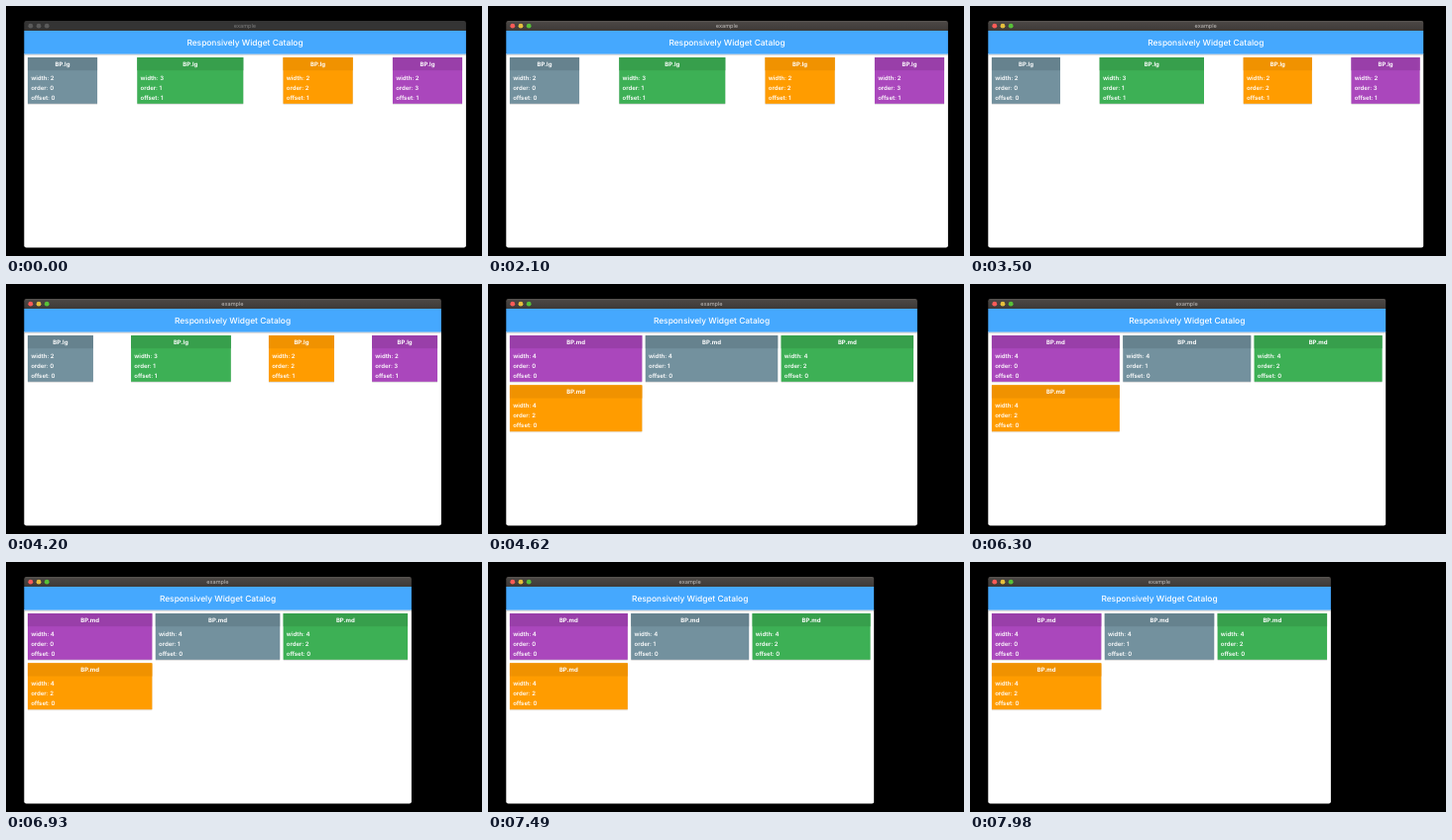
Write an HTML page that moves like this. It is 480x253 px and loops after 8000 ms.

```html
<!DOCTYPE html>
<html lang="en">
<head>
<meta charset="utf-8">
<title>Responsive grid</title>
<style>
  html, body { margin: 0; width: 100%; height: 100%; overflow: hidden; background: #000; }
  svg { display: block; width: 480px; height: 253px; }
  text { font-family: Inter, Roboto, sans-serif; fill: #fff; text-rendering: geometricPrecision; }
  .mid { text-anchor: middle; }
  .head { font-size: 6px; font-weight: 700; }
  .line { font-size: 6px; font-weight: 600; }
</style>
</head>
<body>
<svg id="stage" viewBox="0 0 480 253">
  <defs>
    <linearGradient id="chrome" x2="0" y2="1">
      <stop offset="0" stop-color="#5a5653"/><stop offset=".2" stop-color="#4a4643"/><stop offset="1" stop-color="#3d3a38"/>
    </linearGradient>
    <linearGradient id="fade" x2="0" y2="1">
      <stop offset="0" stop-color="#000" stop-opacity=".25"/><stop offset="1" stop-color="#000" stop-opacity="0"/>
    </linearGradient>
    <filter id="soft" x="-10%" y="-10%" width="120%" height="125%">
      <feDropShadow dx="0" dy=".4" stdDeviation=".6" flood-opacity=".35"/>
    </filter>
    <clipPath id="frame"><rect id="clip" x="18.3" y="15" height="229.5" rx="2.2"/></clipPath>
  </defs>
  <rect width="480" height="253"/>
  <g id="win" clip-path="url(#frame)"></g>
</svg>
<script>
const NS = 'http://www.w3.org/2000/svg';
const win = document.getElementById('win');
const clip = document.getElementById('clip');

function add(tag, attrs, parent = win) {
  const el = document.createElementNS(NS, tag);
  set(el, attrs);
  return parent.appendChild(el);
}
function set(el, attrs) {
  for (const k in attrs) k === 'text' ? el.textContent = attrs[k] : el.setAttribute(k, attrs[k]);
}

const LEFT = 18, PAD = 2.2, GAP = 1.75, LOOP = 8000, STEP = 70;
const FOCUS_AT = 2100, BREAK_AT = 433;

// right window edge over time
const drag = [[3080, 464], [3500, 457.5], [3920, 442.3], [4200, 439], [4760, 431],
  [5040, 430.8], [5460, 429], [5880, 426], [6720, 413], [6930, 409], [7560, 387], [7980, 364]];

// per layout: [column, row, width, order, offset]
const cards = [
  { fill: '#73919e', head: '#66828e', lg: [0, 0, 2, 0, 0], md: [4, 0, 4, 1, 0] },
  { fill: '#3db055', head: '#379f4c', lg: [3, 0, 3, 1, 1], md: [8, 0, 4, 2, 0] },
  { fill: '#ff9c00', head: '#f09200', lg: [7, 0, 2, 2, 1], md: [0, 1, 4, 2, 0] },
  { fill: '#aa47bc', head: '#993fa9', lg: [10, 0, 2, 3, 1], md: [0, 0, 4, 0, 0] }
];

const page = add('rect', { x: LEFT, y: 48, height: 197, fill: '#fff' });
const shade = add('rect', { x: LEFT, y: 48.6, height: 2, fill: 'url(#fade)' });
const appBar = add('rect', { x: LEFT, y: 25, height: 23.6, fill: '#45a8fe' });
const title = add('text', { y: 39.5, class: 'mid', 'font-size': 8.4, 'font-weight': 500, text: 'Responsively Widget Catalog' });
const bar = add('rect', { x: LEFT, y: 15, height: 10 });
const name = add('text', { y: 22.2, class: 'mid', 'font-size': 5.6, text: 'example' });
const lights = ['#fc5b57', '#e5bf3c', '#57c038'].map((on, i) =>
  ({ on, el: add('circle', { cx: 24.8 + i * 8.2, cy: 20.2, r: 2.4 }) }));

for (const c of cards) {
  c.g = add('g', {});
  c.body = add('rect', { height: 46.8, fill: c.fill, filter: 'url(#soft)' }, c.g);
  c.top = add('rect', { height: 13.2, fill: c.head }, c.g);
  c.label = add('text', { y: 9.1, class: 'head mid' }, c.g);
  c.lines = [0, 1, 2].map(i => add('text', { x: 3.2, y: 22.6 + i * 10.1, class: 'line' }, c.g));
}

function edgeAt(t) {
  if (t <= drag[0][0]) return drag[0][1];
  const i = drag.findIndex(k => k[0] >= t);
  if (i < 0) return drag[drag.length - 1][1];
  const [t0, x0] = drag[i - 1], [t1, x1] = drag[i];
  return x0 + (x1 - x0) * (t - t0) / (t1 - t0);
}

function draw(ms) {
  const t = Math.floor(ms % LOOP / STEP) * STEP;
  const right = edgeAt(t), width = right - LEFT, center = LEFT + width / 2;
  const unit = (width - 2 * PAD) / 12;
  const mode = right > BREAK_AT ? 'lg' : 'md';
  const active = t >= FOCUS_AT;

  set(clip, { width: width - .4 });
  for (const el of [page, shade, appBar, bar]) set(el, { width });
  set(title, { x: center });
  set(name, { x: center, fill: active ? '#c4c1bf' : '#7c7c7c', style: `fill:${active ? '#c4c1bf' : '#7c7c7c'}` });
  set(bar, { fill: active ? 'url(#chrome)' : '#343434' });
  for (const l of lights) set(l.el, { fill: active ? l.on : '#5a5a5a' });

  for (const c of cards) {
    const [col, row, span, order, offset] = c[mode];
    const w = span * unit - 2 * GAP;
    set(c.g, { transform: `translate(${LEFT + PAD + col * unit + GAP} ${52 + row * 50.4})` });
    set(c.body, { width: w });
    set(c.top, { width: w });
    set(c.label, { x: w / 2, text: 'BP.' + mode });
    ['width: ' + span, 'order: ' + order, 'offset: ' + offset].forEach((text, i) => set(c.lines[i], { text }));
  }
}

function tick() {
  draw(performance.now());
  requestAnimationFrame(tick);
}
draw(0);
tick();
</script>
</body>
</html>
```
